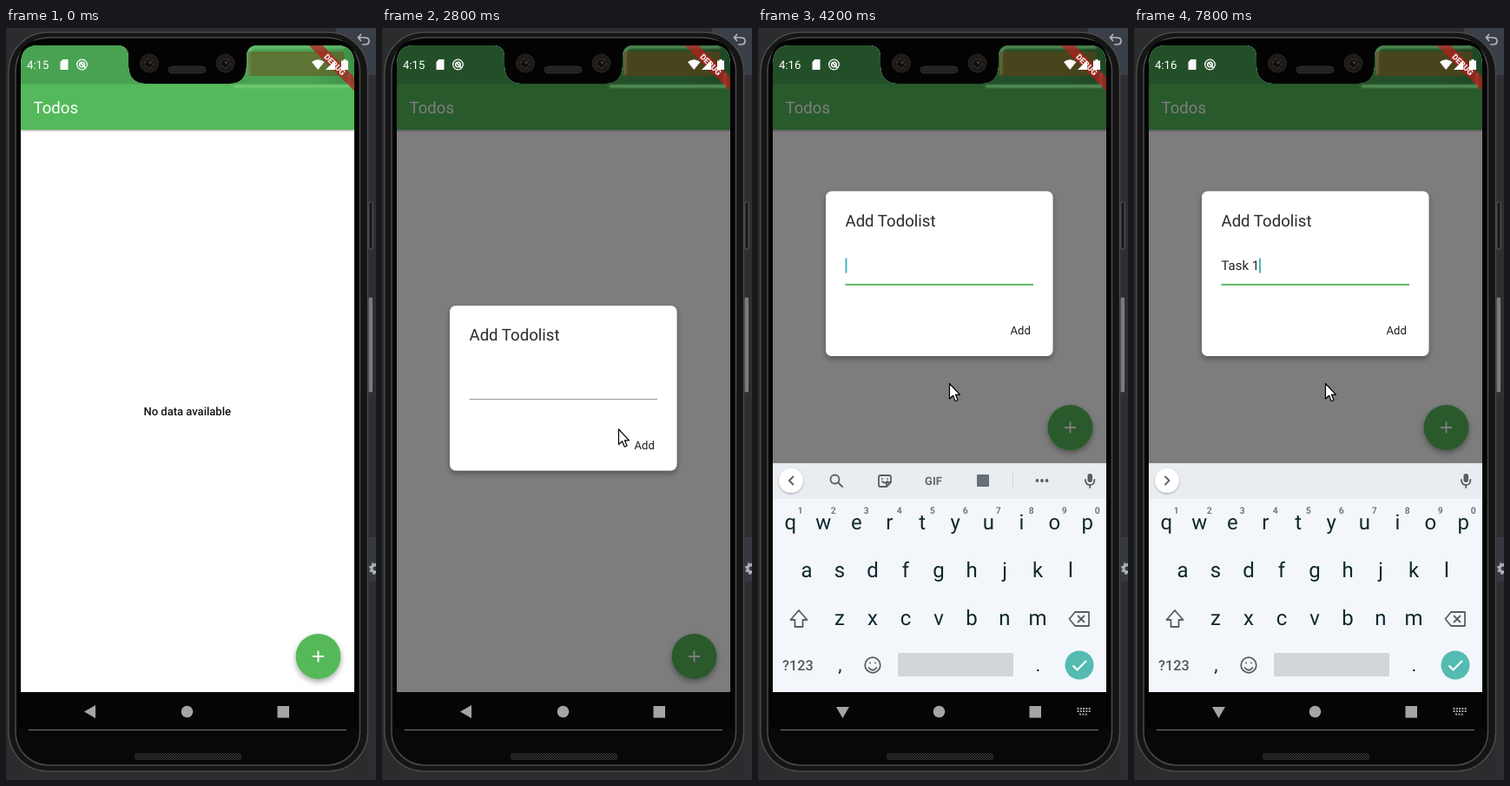
An HTML page for the animation above (8000 ms loop, 426x864 px).

```html
<!DOCTYPE html>
<html lang="en">
<head>
<meta charset="utf-8">
<title>Todo app demo</title>
<style>
  html, body { margin: 0; width: 100%; height: 100%; overflow: hidden; background: #2b2c2e; }
  svg { display: block; width: 426px; height: 864px; font-family: Roboto, "Noto Sans", sans-serif; }
  text { white-space: pre; text-rendering: geometricPrecision; }
  .mid { text-anchor: middle; }
  .line { fill: none; stroke: #566064; stroke-width: 1.8; stroke-linejoin: round; stroke-linecap: round; }
  #letters { font-size: 24px; fill: #10292b; }
  #digits { font-size: 10.5px; fill: #5c676b; font-weight: 500; }
  #words { font-size: 16.8px; fill: #6b7175; }
</style>
</head>
<body>
<svg viewBox="0 0 426 864">
  <defs>
    <clipPath id="screen"><path d="M17 768V42Q17 20 37 20H128Q141 20 141 34V44Q142 64 161 64H258Q276 64 277 44V34Q277 20 290 20H381Q401 20 401 42V768Z"/></clipPath>
    <filter id="soft" x="-20%" y="-20%" width="140%" height="150%"><feDropShadow dx="0" dy="3" stdDeviation="3" flood-opacity=".35"/></filter>
    <filter id="low" x="-20%" y="-20%" width="140%" height="150%"><feDropShadow dx="0" dy="1" stdDeviation="1.2" flood-opacity=".35"/></filter>
    <filter id="glow" x="-10%" y="-30%" width="120%" height="160%"><feGaussianBlur stdDeviation="1.1"/></filter>
    <pattern id="mesh" width="3" height="3" patternUnits="userSpaceOnUse">
      <rect width="3" height="3" fill="#161616"/><path d="M0 3L3 0" stroke="#3c3c3c"/>
    </pattern>
    <linearGradient id="tab"><stop offset=".88" stop-color="#48a252"/><stop offset="1" stop-color="#3d9049"/></linearGradient>
  </defs>

  <!-- window and phone body -->
  <rect width="426" height="864" fill="#2b2c2e"/>
  <rect x="380" width="46" height="54" fill="#3a3e46"/>
  <rect x="418" y="54" width="8" height="810" fill="#2d2f32"/>
  <rect x="418" y="585" width="8" height="50" fill="#363a40"/>
  <path d="M409 7L405.500 11L409 15M406 11H413Q418 11 418 15T413 19H410" fill="none" stroke="#b4b8bd" stroke-width="1.700"/>
  <circle cx="425" cy="621" r="4" fill="none" stroke="#b0b4b8" stroke-width="3"/>
  <circle cx="425" cy="621" r="6" fill="none" stroke="#b0b4b8" stroke-width="2" stroke-dasharray="2.500 2.200"/>
  <rect x="418" y="200" width="4" height="54" rx="1" fill="#151515" stroke="#5c5c5c"/>
  <rect x="418" y="310" width="3.500" height="108" rx="1" fill="#777" stroke="#999" stroke-width=".7"/>
  <rect x="3" y="5" width="413.500" height="849" rx="45" fill="#151515" stroke="#484848" stroke-width="1.500"/>
  <rect x="11" y="11" width="396.500" height="836" rx="38" fill="#080808" stroke="#4a4a4a" stroke-width="1.500"/>
  <path d="M13.500 795V46Q13.500 14 42 13H376Q404.500 14 404.500 46V795Q403 806 390 806H28Q15 806 13.500 795Z" fill="#030303"/>
  <path d="M26 806.500H392" stroke="#777"/>
  <rect x="148" y="833" width="123" height="8" rx="3" fill="url(#mesh)"/>
  <rect x="17" y="763" width="384" height="41" fill="#050505"/>

  <!-- app -->
  <g clip-path="url(#screen)">
    <rect x="17" y="20" width="384" height="743" fill="#fff"/>
    <rect x="17" y="20" width="384" height="97" fill="#54b95a" filter="url(#low)"/>
    <rect x="17" y="19" width="384" height="46" fill="url(#tab)"/>
    <rect x="17" y="64.500" width="384" height="52.500" fill="#54b95a"/>
    <text x="31.500" y="98" font-size="18.600" fill="#fff">Todos</text>
    <text id="empty" class="mid" x="208.700" y="445" font-size="13" font-weight="500" fill="#111">No data available</text>
    <g id="fab">
      <circle cx="359.500" cy="722" r="26" fill="#54b95a" filter="url(#soft)"/>
      <path d="M353 722H366M359.500 715.500V728.500" stroke="#fff" stroke-width="1.900"/>
      <circle id="ripple" cx="359.500" cy="722" r="26" fill="#fff"/>
    </g>
    <rect id="shade" x="17" y="19" width="384" height="744"/>
    <path d="M280 54V28Q281 22 288 22H390M262 67H395V52" fill="none" stroke="#9be8a0" stroke-width="3" opacity=".45" filter="url(#glow)"/>
    <rect x="278.500" y="27" width="111" height="28" rx="2" fill="#78380f" opacity=".43"/>

    <g id="dialog">
      <rect x="78" y="319" width="261.500" height="189.500" rx="7" fill="#fff" filter="url(#soft)"/>
      <text x="100.500" y="359" font-size="18.600" fill="#2a2a2a">Add Todolist</text>
      <text id="field" x="100.500" y="409" font-size="14.930" fill="#222"></text>
      <rect id="compose" x="101" y="411" height="1" fill="#333"/>
      <rect id="caret" y="396" width="2" height="17" fill="#45b3c4"/>
      <rect id="rule" x="100.500" width="216.500"/>
      <text x="290.500" y="483.500" font-size="13.070" fill="#1c1c1c">Add</text>
    </g>

    <g transform="translate(401 19.600) rotate(45)">
      <rect x="-37.300" y="26.100" width="74.600" height="11.200" fill="#b71c1c" opacity=".72"/>
      <text class="mid" y="35.100" font-size="9.500" font-weight="900" fill="#fff" opacity=".9">DEBUG</text>
    </g>

    <!-- keyboard -->
    <g id="board">
      <rect x="17" y="500" width="384" height="263" fill="#f3f7fc"/>
      <rect x="17" y="500" width="384" height="41" fill="#e9edf2"/>
      <circle cx="38" cy="520" r="14" fill="#fff" filter="url(#low)"/>
      <path id="chevron" class="line" d="M36 515.500L40.500 520L36 524.500"/>
      <g id="tools">
        <circle class="line" cx="88.500" cy="518.500" r="5"/><path class="line" d="M92.500 522.500L97 527"/>
        <path class="line" d="M141 514H151Q153 514 153 516V522L148 527H141Q139 527 139 525V516Q139 514 141 514ZM153 522H148V527M143 521Q146 524 149 521M143 518V518M149 518V518"/>
        <text class="mid" x="202" y="525" font-size="13" font-weight="700" fill="#5f696d">GIF</text>
        <rect x="252" y="513" width="14" height="14" rx="1" fill="#667074"/>
        <path d="M293.500 510V531" stroke="#d3d8dc"/>
        <g fill="#566064"><circle cx="321.500" cy="520" r="1.900"/><circle cx="327" cy="520" r="1.900"/><circle cx="332.500" cy="520" r="1.900"/></g>
      </g>
      <g id="words">
        <path d="M151.500 510V531M264.500 510V531" stroke="#cfd4d9"/>
        <text class="mid" x="101" y="526.500"></text>
        <text class="mid" x="207.500" y="526.500" font-weight="700" fill="#111"></text>
        <text class="mid" x="313.500" y="526.500"></text>
      </g>
      <rect x="379.500" y="512" width="5.500" height="10" rx="2.700" fill="#566064"/>
      <path class="line" d="M377 519Q377 525 382.200 525T387.400 519M382.200 525V528"/>
      <g id="letters"></g>
      <g id="digits"></g>
      <path class="line" d="M47 669L56.500 680H51.500V688H42.500V680H37.500Z"/>
      <path class="line" d="M365 671H381V687H365L358.500 679ZM368.500 675.500L375.500 682.500M375.500 675.500L368.500 682.500"/>
      <text x="28" y="738" font-size="16.300" font-weight="500" fill="#4c5a5e">?123</text>
      <text class="mid" x="94.500" y="739" font-size="22" fill="#10292b">,</text>
      <text class="mid" x="322.500" y="739" font-size="22" fill="#10292b">.</text>
      <circle class="line" cx="132" cy="732" r="8.800"/>
      <path class="line" d="M127.500 735Q132 740.500 136.500 735M129 729.500V729.500M135 729.500V729.500"/>
      <rect x="161" y="718" width="133" height="27" rx="2" fill="#d2d6da"/>
      <circle cx="370" cy="732" r="16.500" fill="#53bbb1"/>
      <path d="M362.500 732.500L367.500 737.500L378 727" fill="none" stroke="#fff" stroke-width="2.200"/>
    </g>
  </g>

  <!-- status bar -->
  <g fill="#fff">
    <text id="clock" x="24" y="47" font-size="13.200"></text>
    <path d="M65.500 36H71.500V48H62.500V39Z"/>
    <circle cx="87.500" cy="42" r="5.800" fill="none" stroke="#fff" stroke-width="1.300"/>
    <circle cx="87.500" cy="42" r="2.800" fill="none" stroke="#fff" stroke-width="1.500"/><path d="M86 40L91.500 46" stroke="#fff" stroke-width="1.500"/>
    <path d="M352 39Q359 33.500 366.500 39L359.200 48Z"/>
    <path d="M368 48L379 37V48Z"/>
    <path d="M386 37.500H388.500V36H391.500V37.500H394V48H386Z"/>
  </g>

  <!-- notch hardware -->
  <g id="cameras"></g>
  <rect x="187" y="44" width="43" height="8" rx="4" fill="url(#mesh)" stroke="#2b2b2b"/>

  <!-- navigation icons -->
  <g fill="#a5a5a5">
    <path id="back" d="M90 785.500L103 778V793Z"/>
    <circle cx="208.500" cy="785.500" r="6.800"/>
    <rect x="312.500" y="779" width="13.500" height="13.500"/>
    <path id="switch" d="M367.500 782H383M367.500 785H383M370 788.500H380" fill="none" stroke="#a5a5a5" stroke-width="1.800" stroke-dasharray="2 1.300"/>
  </g>

  <path id="pointer" d="M0 0V17.500L4 13.800L6.800 20.200L9.600 19L6.900 12.800H12Z" fill="#fff" stroke="#000" stroke-width="1.200" stroke-linejoin="round"/>
</svg>

<script>
const LOOP = 8000, LEFT = 100.5;
const $ = id => document.getElementById(id);
const set = (el, attrs) => { for (const k in attrs) el.setAttribute(k, attrs[k]); };
const show = (el, on) => el.setAttribute("visibility", on ? "inherit" : "hidden");
const shift = (el, y) => el.setAttribute("transform", `translate(0 ${y})`);

// Each step changes only the listed values; the rest carry over.
const steps = [
  [0,    { clock: "4:15", pointer: null, shade: 0, ripple: 0, dialog: 0, lift: 0, focus: false, caret: 0,
           text: "", words: null, board: null, drop: 0, turn: 0 }],
  [600,  { pointer: [298, 773] }],
  [800,  { pointer: [334, 741] }],
  [1000, { pointer: [355, 713] }],
  [2600, { shade: .43, dialog: .8, ripple: .2 }],
  [2800, { shade: .51, dialog: 1, ripple: 0, pointer: [272.5, 461] }],
  [3000, { pointer: [235, 425] }],
  [3200, { pointer: [220.5, 408.5] }],
  [3600, { clock: "4:16", focus: true }],
  [3800, { board: .95, drop: 2.3, turn: -76, caret: .6 }],
  [4000, { board: 1, drop: 0, turn: -90, lift: -131.5, caret: 1 }],
  [4600, { caret: 0 }],
  [5000, { caret: 1 }],
  [5600, { text: "T", words: ["T", "Test", "Thanks"] }],
  [6000, { text: "Ta", words: ["Ta", "Take", "Talk"] }],
  [6600, { text: "Tas", words: ["Tas", "Task", "Taste"] }],
  [7000, { text: "Task", words: ["Task", "Tasks", "Taken"] }],
  [7600, { text: "Task ", words: [] }],
  [7800, { text: "Task 1" }]
];

function addText(parent, x, y, str) {
  const el = document.createElementNS("http://www.w3.org/2000/svg", "text");
  set(el, { x, y, class: "mid" });
  el.textContent = str;
  parent.append(el);
}

[["qwertyuiop", 37.3], ["asdfghjkl", 56], ["zxcvbnm", 94]].forEach(([row, x0], r) =>
  [...row].forEach((c, i) => {
    const x = x0 + i * 38;
    addText($("letters"), x, 576 + r * 55, c);
    if (!r) addText($("digits"), x + 11.5, 558, (i + 1) % 10);
  }));

$("cameras").innerHTML = [165, 252.5].map(x =>
  `<circle cx="${x}" cy="40.500" r="10.500" fill="#1d1a18" stroke="#292522"/>
   <circle cx="${x}" cy="40.500" r="5" fill="#12100f" stroke="#4d463f" stroke-dasharray="3 2"/>
   <circle cx="${x + 1}" cy="39.500" r="1.500" fill="#4a4440"/>`).join("");

function stateAt(t) {
  return Object.assign({}, ...steps.filter(s => s[0] <= t).map(s => s[1]));
}

function draw(s) {
  const up = s.board !== null;
  $("clock").textContent = s.clock;
  set($("shade"), { opacity: s.shade });
  set($("ripple"), { opacity: s.ripple });
  set($("dialog"), { opacity: s.dialog });
  shift($("dialog"), s.lift);
  shift($("fab"), up ? -263 : 0);
  shift($("empty"), up ? -132 : 0);

  $("field").textContent = s.text;
  const width = s.text ? $("field").getComputedTextLength() : 0;
  set($("caret"), { x: LEFT + width, opacity: s.caret });
  set($("compose"), { width: /\s/.test(s.text) ? 0 : width });
  set($("rule"), s.focus ? { y: 425.4, height: 1.9, fill: "#56b35b" } : { y: 426, height: 1, fill: "#999" });

  show($("board"), up);
  show($("switch"), up);
  set($("board"), { opacity: s.board ?? 0 });
  shift($("board"), s.drop);
  show($("tools"), !s.words);
  show($("words"), s.words && s.words.length);
  set($("chevron"), { transform: s.words ? "" : "rotate(180 38.2 520)" });
  $("words").querySelectorAll("text").forEach((el, i) => el.textContent = s.words?.[i] ?? "");
  set($("back"), { transform: `rotate(${s.turn} 97.5 785.5)` });

  show($("pointer"), s.pointer);
  if (s.pointer) set($("pointer"), { transform: `translate(${s.pointer})` });
}

function frame() {
  draw(stateAt(performance.now() % LOOP));
  requestAnimationFrame(frame);
}
frame();
</script>
</body>
</html>
```
